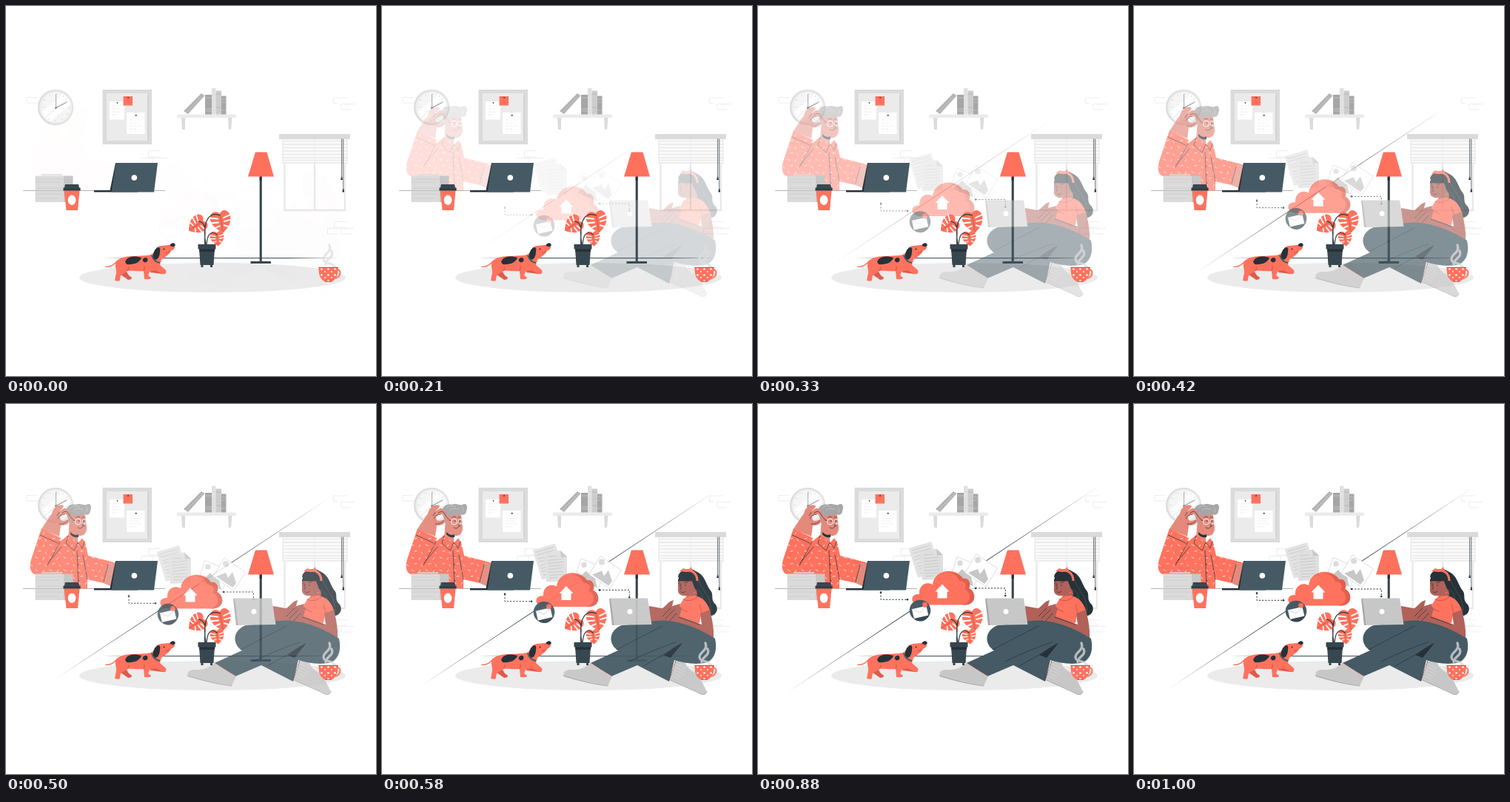
Recreate the animation shown at these times as an HTML page. Size 500 px wide and 500 px high, loop 1040 ms.

```html
<!DOCTYPE html>
<html lang="en">
<head>
<meta charset="utf-8">
<title>Working from home</title>
<style>
html, body { margin: 0; width: 100%; height: 100%; overflow: hidden; background: #fff; }
svg { display: block; width: 100vw; height: 100vh; }
.fade { opacity: var(--fade, 0); }
.line { fill: none; stroke: #263238; stroke-width: .7; stroke-linecap: round; stroke-linejoin: round; }
.coral { fill: #ff725e; }
.dark { fill: #263238; }
.slate { fill: #37474f; }
.blue { fill: #455a64; }
.tan { fill: #e4897b; }
.brown { fill: #b16158; }
.white { fill: #fff; }
.g1 { fill: #ebebeb; }
.g2 { fill: #dbdbdb; }
.g3 { fill: #c7c7c7; }
.g4 { fill: #a6a6a6; }
</style>
</head>
<body>
<svg viewBox="0 0 500 500">
<defs>
  <pattern id="lampDots" width="5" height="5" patternUnits="userSpaceOnUse"><circle cx="1.3" cy="1.3" r=".55" fill="#e5604e"/><circle cx="3.8" cy="3.8" r=".55" fill="#e5604e"/></pattern>
  <pattern id="mugDots" width="9" height="8" x="424" y="352" patternUnits="userSpaceOnUse"><circle cx="2.5" cy="3.5" r="1.3" fill="#fff"/><circle cx="7" cy="7" r="1" fill="#fff"/><circle cx="7" cy="-1" r="1" fill="#fff"/></pattern>
  <pattern id="flecks" width="19" height="17" patternUnits="userSpaceOnUse"><path d="M2 3l3 1.500M12 6l1.500-2.500M6 12l3-.5M15 13l1.500 2" stroke="#fff" stroke-width=".8" stroke-linecap="round"/></pattern>
  <clipPath id="face"><circle cx="67.500" cy="137" r="20.500"/></clipPath>
  <path id="shirt" d="M84 177L98 187L103 181L107 187L111 205L146 214L141 244L110 237V249.500H90V230H39C32 228 31 218 35 207L48 168L74 181L73 186Z"/>
  <path id="bowl" d="M422.500 353H449C449 363 446 370 440 372.500H431C425 370 422 363 422.500 353Z"/>
  <path id="shade" d="M337 197.500H352.500L362 230.500H327Z"/>
  <g id="leaf">
    <path class="coral" d="M0 0C-3-5-10-5-13 0C-16 6-13 14-8 19C-5 22-2 24 0 26C4 23 11 18 13 10C15 3 11-4 6-4C3-4 1-2 0 0Z"/>
    <path d="M-15 3L-4 6M-15 10L-4 11M-11 18L-3 16M15 3L4 6M14 10L4 11M9 19L3 16" stroke="#fff" stroke-width="1.900" stroke-linecap="round"/>
    <path class="line" d="M0 0V24" style="stroke:#a84b3e;stroke-width:.6"/>
  </g>
</defs>

<!-- Wall -->
<path d="M42 123.500H28V131H44M461 124H442.500V131.500H448M471 132.500H453V140H466M209 195.500H192.500V204H210M219 205.500H183V211M198 212V205.500M461 291.500H443.500V299H459M470 300.500H434.500V308H449M453 308V300.500M453 308H467" fill="none" stroke="#ededed" stroke-width=".9"/>
<g>
  <circle cx="67" cy="137" r="24" class="g2"/><circle cx="67.500" cy="137" r="22.500" class="g1"/>
  <circle cx="67.500" cy="137" r="20.500" fill="#f5f5f5"/>
  <path clip-path="url(#face)" d="M45 151L84 118M52 158L92 124" stroke="#fff" stroke-width="7"/>
  <circle cx="67.500" cy="137" r="18" fill="none" stroke="#ccc" stroke-width="2" stroke-dasharray=".7 8.725"/>
  <path d="M67.500 137.500V119" stroke="#aaa" stroke-width="1"/><path d="M66 138.500L82 130" stroke="#888" stroke-width="1"/>
  <circle cx="67.500" cy="137.500" r="1.300" fill="#888"/>
</g>
<g>
  <path class="g2" d="M130.500 113H197V187H130.500Z"/><path fill="#ebebeb" d="M136 118H191V182H136Z"/><path fill="#cfcfcf" d="M191 118h1.300V182H191Z"/>
  <path class="white" d="M140 129H160V153.500H140ZM163 144H187.500V173H163Z"/>
  <path d="M143 135h13M143 139h10M143 143h12M143 147h7M167 154h16M167 158h13M167 162h16M167 166h9" stroke="#eee" stroke-width=".9" stroke-dasharray="5 .7"/>
  <path class="coral" d="M158.500 122H171V134.500H158.500Z"/>
  <g class="dark"><circle cx="150.500" cy="130.800" r=".9"/><circle cx="165" cy="124" r=".9"/><circle cx="175.700" cy="147.800" r="1"/></g>
</g>
<g>
  <path class="g1" d="M231 146.500H311V151H231Z"/><path class="g2" d="M237 151h5V167h-4ZM300 151h5.500L304 167h-3Z"/>
  <path fill="#b3b3b3" d="M240 142L264 118L268.500 121L246 146Z"/><path d="M243.500 144L266.500 120" stroke="#ccc"/>
  <path class="g4" d="M269 120H278V146.500H269Z"/><path fill="#e0e0e0" d="M278 111H283.500V146.500H278Z"/>
  <path fill="#cdcdcd" d="M283.500 114.500H291V146.500H283.500Z"/><path class="g4" d="M291 121.500H297.500V146.500H291Z"/>
  <path d="M269 124h9M269 139h9M269 142h9M291 126h6.500M291 130h6.500M291 141h6.500" stroke="#c7c7c7" stroke-width=".8"/><path d="M284 119h7M284 137h7" stroke="#b5b5b5" stroke-width=".8"/>
</g>
<g>
  <path d="M376.500 206H458V276H376.500ZM417 206V276" fill="#fff" stroke="#e9e9e9" stroke-width="2.300"/>
  <path fill="#fafafa" d="M373 180H462V213H373Z"/>
  <path d="M373 182.500H462M373 187H462M373 191.500H462M373 196H462M373 200.500H462M373 205H462M373 208.500H462M373 212H462" stroke="#e9e9e9" stroke-width="1.300"/>
  <path d="M374 180V213M417 180V213M461 180V213" stroke="#ebebeb"/>
  <path class="g2" d="M369 173H465V180H369Z"/>
  <path class="line" d="M453.600 180V233M455.800 180V249"/><path class="dark" d="M453.100 231h1l.9 4h-2.800ZM455.300 247h1l.9 4.500h-2.800Z"/>
</g>

<!-- Floor -->
<ellipse class="g1" cx="279" cy="367" rx="180" ry="20"/>
<path fill="#59666a" d="M129 340.700L210 340.100H380L450 340.700L380 341.300H210Z"/>
<path d="M23 249.500H215" stroke="#8d9599" stroke-width=".7"/>

<g class="fade"><path id="divider" class="dark" d="M45 386L249.700 250L455 115L250.300 251Z"/></g>

<!-- Shared files -->
<g id="files">
  <g class="fade">
    <path fill="#e3e3e3" d="M203.500 196L234 187L247 226L216 236Z"/>
    <path d="M208 199l24-7M209 203l24-7M211 208l24-7M212 212l12-4M214 217l8-3M215 221l7-2M216 225l5-2M218 230l4-1" stroke="#cdcdcd" stroke-width="1.100"/>
    <path fill="#dfdfdf" d="M219.500 200L241 196.500L250 205V237.500L222 239Z"/><path class="g3" d="M241 196.500L242 205.500L250 205Z"/>
    <path d="M224 205l13-1M224 210l21-2M224 214l21-2M225 218l20-2M225 222l20-2M225 226l20-1M226 230l19-1M226 234l12-1" stroke="#c7c7c7" stroke-width=".9"/>
  </g>
  <g class="fade" stroke-linejoin="round">
    <path d="M269 207.500L302 221L291 251L259 238Z" fill="#fff" stroke="#d3d3d3" stroke-width=".8"/>
    <circle class="g2" cx="273" cy="216" r="3.700"/><path class="g3" d="M263 236L276 224L282 231L286 227L291 247Z"/>
    <path d="M295 204L323.500 223L308 248L280 229Z" fill="#fff" stroke="#d3d3d3" stroke-width=".8"/>
    <circle class="g2" cx="297" cy="212" r="4"/><path class="g3" d="M284 229L297 224L300 231L306 223L311 238L306 244Z"/>
  </g>
  <g class="fade">
    <path class="coral" d="M219 272.500C205 272 205 257 218 258C217 247 226 240 236 245C238 224 268 221 277 237C286 235 288 246 285 250C295 254 296 272 280 272.500Z"/>
    <path fill="#e0604f" d="M257 228.500C267 228 275 233 277 237C286 235 288 246 285 250C295 254 296 272 280 272.500H276C289 270 289 255 279 251C283 246 280 240 272 240C271 234 264 230 257 228.500Z"/>
    <path class="white" d="M249 244.500L258.500 254.500H255.500V263.500H242.500V254.500H239.500Z"/>
  </g>
  <g class="fade">
    <circle class="blue" cx="219" cy="280" r="14.300"/><path class="slate" d="M209 289L229 287L232 285C227 297 215 297 209 289Z"/>
    <g transform="rotate(-13 219 282)"><path class="white" d="M209 276h20v13h-20Z"/><path class="line" d="M209 276l10 7l10-7" style="stroke:#c7c7c7"/></g>
    <circle class="coral" cx="225.500" cy="272.300" r="3.400"/>
  </g>
  <g class="fade">
    <path d="M166 255.500V265.300H202M294 250H334.300V260" fill="none" stroke="#263238" stroke-width="1" stroke-dasharray="2.200 2"/>
    <g class="dark"><circle cx="166" cy="255.500" r="1.300"/><circle cx="202" cy="265.300" r="1.300"/><circle cx="294" cy="250" r="1.300"/><circle cx="334.300" cy="260" r="1.300"/></g>
  </g>
</g>

<!-- Man -->
<g class="fade">
  <path class="tan" d="M86 154C90 146 102 145 107 150L109 167C109 176 104 179 97 178V188L84 182Z"/>
  <path class="g4" d="M82 149C79 140 87 134 94 136C100 133 106 138 109 136C113 133 117 138 114 144C114 149 110 151 105 149C98 151 92 149 90 154L88 162L85 160Z"/>
  <path class="line" d="M87 140q6-5 12-1M92 143q6-4 12 0M108 139q3 2 1 7" style="stroke:#c7c7c7"/>
  <path class="line" d="M90 157L94 157.500M101 159L104 158M104 158V165H106M97 167q5 3 7-2M95 153q3-2 5 0M103 153h3"/>
  <circle cx="97.500" cy="159" r="4" fill="none" stroke="#fff" stroke-width=".9"/><circle cx="106" cy="159" r="3" fill="none" stroke="#fff" stroke-width=".9"/>
  <circle class="dark" cx="98.500" cy="158" r=".8"/><circle class="dark" cx="105.500" cy="158" r=".8"/>
  <path class="dark" d="M87 173C91 177 95 178 98 176V180C93 181 89 179 87 176Z"/>
  <use href="#shirt" class="coral"/><use href="#shirt" fill="url(#flecks)"/>
  <path class="tan" d="M137 216L149 214L143 247L132 242Z"/>
  <path class="line" d="M84 178L81 188L92 198L97 187L103 195L106 186M96 198L98 249M104 204L110 237M73 186L56 218M57 215L75 193M138 217L132 240M46 177L70 188"/>
  <g class="dark"><circle cx="97" cy="206" r=".8"/><circle cx="97.500" cy="217" r=".8"/><circle cx="98" cy="228" r=".8"/><circle cx="98.500" cy="239" r=".8"/></g>
  <path class="tan" fill-rule="evenodd" d="M48 169C53 161 57 155 62 148C64 140 70 135 77 137C80 139 73 143 72 146C78 138 84 141 84 145L90 151C94 157 91 159 86 158C84 163 78 165 74 164L72 179ZM73 153C76 148 82 148 84 151C87 154 84 156 81 157C77 159 73 158 73 153Z"/>
  <path class="line" d="M72 146L69 151M76 147Q83 142 86 151L91 157M70 155Q73 149 79 149M72 162Q80 163 83 158"/>
</g>

<!-- Desk -->
<path class="g2" d="M39.500 229.500H77.500V265H39.500Z"/><path class="g3" d="M77.500 229.500H90.500V265H77.500Z"/>
<path d="M48 228H76" stroke="#dbdbdb" stroke-width="1.500"/><path d="M40 234H77M40 238H72M40 246H77M40 254H77M40 260H70" stroke="#c7c7c7" stroke-width=".7"/>
<path d="M39 249.500H80" stroke="#a9b0b2" stroke-width=".6"/>
<path class="dark" d="M119 249H178V251.500H119ZM148 212L150 212L144 251.500H140Z"/>
<path class="blue" d="M148.500 212H205L200 251.500H142.500Z"/><circle class="white" cx="173.300" cy="232" r="3.800"/>
<path class="coral" d="M78.500 249H99.500L97 276H81.500Z"/><path class="slate" d="M80 241H98L99 245.500H100.500V249.500H77.500V245.500H79Z"/>
<path d="M77.500 247.800H100.500" stroke="#263238"/><ellipse class="white" cx="89" cy="262.300" rx="5.300" ry="6.800"/>

<!-- Lamp -->
<path class="slate" d="M342.700 229H345.800V345H358V348H330.500V345H342.700Z"/><path class="dark" d="M342.700 230h3.100v6h-3.100Z"/>
<use href="#shade" class="coral"/><use href="#shade" fill="url(#lampDots)"/>

<!-- Woman -->
<g class="fade">
  <path class="dark" d="M400 233C403 222 418 221 424 226C437 231 437 243 444 252C449 258 443 264 451 271C457 280 447 290 439 285C430 283 429 276 425 269L419 262Z"/>
  <path class="line" d="M427 238q8 15 12 20t6 22M426 250q9 8 8 18" style="stroke:#455a64"/>
  <path class="brown" d="M400 237C405 233 417 233 423 237L426 257C424 265 416 268 408 265L412 259C403 260 399 256 400 249Z"/>
  <path class="dark" d="M400 240C400 229 412 225 419 229C427 234 426 248 426 253C421 250 421 241 418 239C411 241 405 238 400 240Z"/>
  <path d="M411 225C419 224 426 229 426 239" fill="none" stroke="#ff725e" stroke-width="3"/><path class="coral" d="M412 227L402 226L407 222L414 224L418 220L420 226Z"/>
  <path class="line" d="M404 243V250L402.500 251M404 254q4 2 6-1M409 242q2-2 4-1M401 242h2"/><circle class="dark" cx="410" cy="245" r=".8"/><circle class="dark" cx="402.500" cy="245" r=".7"/>
  <circle cx="422" cy="255" r="1" class="coral"/>
  <path class="coral" d="M407 264C412 259 421 258 427 260C437 264 442 273 444 282L431 286L429 296L393 293C396 283 401 274 407 264Z"/>
  <path class="line" d="M429 271L433 284M407 264Q417 269 427 260M402 276L413 281" style="stroke:#a84b3e"/>
  <path class="brown" d="M361 273L383 277L400 281L397 293L362 297Z"/>
  <path class="brown" d="M430 283L443 278C446 290 449 304 448 318L426 311L393 297C385 297 377 294 374 291C381 290 386 285 390 281C394 274 400 271 405 276L402 287L432 298Z"/>
  <path class="brown" d="M376 279L389 267L394 265L392 273L403 270L398 290L378 294Z"/>
  <path class="line" d="M390 276L379 287M395 278L383 290M398 283L388 294M401 288L429 298"/>
  <path class="g3" d="M281 350L311 368L305 381C286 379 265 374 247 369C243 364 247 359 255 359C266 360 274 357 281 350Z"/>
  <path class="g3" d="M396 347L410 350C413 358 418 360 424 364C432 373 436 382 439 389C437 394 433 394 427 390L389 373Z"/>
  <path class="blue" d="M324 299C348 297 370 291 386 293C410 295 435 307 450 317C453 330 451 343 440 349C425 353 407 350 395 346L388 375L345 353L310 368L282 350L319 333C307 326 304 307 324 299Z"/>
  <path class="dark" d="M406 323C397 327 389 333 380 339L390 343Z"/>
  <path class="line" d="M397 322C376 329 352 339 334 348M317 332L379 300M353 354L380 339M397 347L388 373"/>
  <path class="line" d="M245 367C266 374 287 379 305 381M389 373L427 390C434 395 439 392 439 388" style="stroke:#999"/>
  <path d="M281 351L310 368M396 347L390 373" stroke="#f4b5ab" stroke-width="1.100"/>
  <path d="M397 351l13 6M396 355l14 7M395 359l13 7M394 363l10 6M393 367l9 5" stroke="#ddd" stroke-width=".7"/>
  <path class="g3" d="M309 262.500H359L364.500 298L312 299Z"/><path class="g4" d="M307 263.500L309 262.500L313.500 299H311Z"/><circle class="white" cx="335" cy="280.500" r="3.500"/>
</g>

<!-- Dog -->
<path d="M135 352.500C142 353 146 349 151 344" fill="none" stroke="#ff725e" stroke-width="1.500" stroke-linecap="round"/>
<path fill="#df5c4c" d="M161 356L166 364L170 367Q170 370 165 370L152 361ZM195 352L213 357L216 360Q216 363 211 362L195 360Z"/>
<path class="coral" d="M148 347C152 339 164 338 175 338C187 337 194 338 199 334L204 326C212 322 218 325 225 321C230 323 229 329 223 331C219 338 213 340 210 343L208 350L216 357Q218 362 212 362L202 357L194 359L192 364L196 367Q196 370 187 369L186 358C177 359 169 357 164 358L155 364L154 369Q155 373 147 371L149 360C149 354 147 351 148 347Z"/>
<path class="dark" d="M161 346C163 338 174 337 183 340C181 347 172 350 163 349ZM185 342C189 338 193 341 191 345C188 348 184 346 185 342ZM200 332C203 325 210 324 208 332C208 339 204 345 200 342C197 339 199 335 200 332ZM222 322Q227 318 229 323Q227 327 222 324Z"/>
<path d="M197 337Q200 346 208 347" fill="none" stroke="#455a64" stroke-width="2"/><circle class="dark" cx="213.500" cy="328.500" r="1"/>
<path class="line" d="M216 334q4 0 6-3M164 358q2-2 2-5M186 358q2-3 1-6" style="stroke:#a84b3e"/>

<!-- Plant -->
<use href="#leaf" transform="translate(266 291) rotate(57) scale(.88)"/>
<use href="#leaf" transform="translate(289 281) rotate(-10)"/>
<use href="#leaf" transform="translate(285 307) rotate(-5) scale(.68)"/>
<path class="line" d="M269 323C267 309 274 293 260 291M270 323C266 299 270 276 289 283M271 323C272 308 277 303 285 309" style="stroke-width:1.200"/>
<path class="slate" d="M261 328H282L280.500 350H279V353H276V350H266.500V353H263.500V350H262.500ZM259.500 322H283.500V328.500H259.500Z"/>
<path class="dark" d="M261 328.500H282.500L282 332H261.500Z"/>

<!-- Mug -->
<path d="M437 323C441 333 429 335 429 342C430 350 439 345 444 352M440 331C444 340 433 340 432 349" fill="none" stroke="#ddd" stroke-opacity=".75" stroke-width="3.300" stroke-linecap="round"/>
<path d="M446 357C453 354 454 365 445 368" fill="none" stroke="#ff725e" stroke-width="2"/>
<use href="#bowl" class="coral"/><use href="#bowl" fill="url(#mugDots)"/>
<path d="M422.500 353.300H449M431 372.300H440" stroke="#a84b3e" stroke-width=".8"/>
</svg>
<script>
const LOOP = 1040, DURATION = 1000, LEAD = 40, RISE = 22;
const divider = document.getElementById('divider');
const files = document.getElementById('files');
const start = performance.now();

const bezier = (a, b, u) => 3 * a * u * (1 - u) ** 2 + 3 * b * u * u * (1 - u) + u ** 3;

// cubic-bezier(.36, -.01, .5, 1.38): slow start, slight overshoot
function ease(x) {
  if (x >= 1) return 1;
  let low = 0, high = 1;
  for (let i = 0; i < 24; i++) {
    const mid = (low + high) / 2;
    if (bezier(.36, .5, mid) < x) low = mid; else high = mid;
  }
  return bezier(-.01, 1.38, low);
}

function draw(now) {
  const time = Math.max(0, now - start) % LOOP;
  const progress = ease((time + LEAD) / DURATION);
  document.documentElement.style.setProperty('--fade', Math.min(1, Math.max(0, progress)));
  const scale = .5 + progress / 2;
  divider.setAttribute('transform', `translate(250 250.5) scale(${scale}) translate(-250 -250.5)`);
  files.setAttribute('transform', `translate(0 ${RISE * (1 - progress)})`);
  requestAnimationFrame(draw);
}
draw(start);
</script>
</body>
</html>
```
